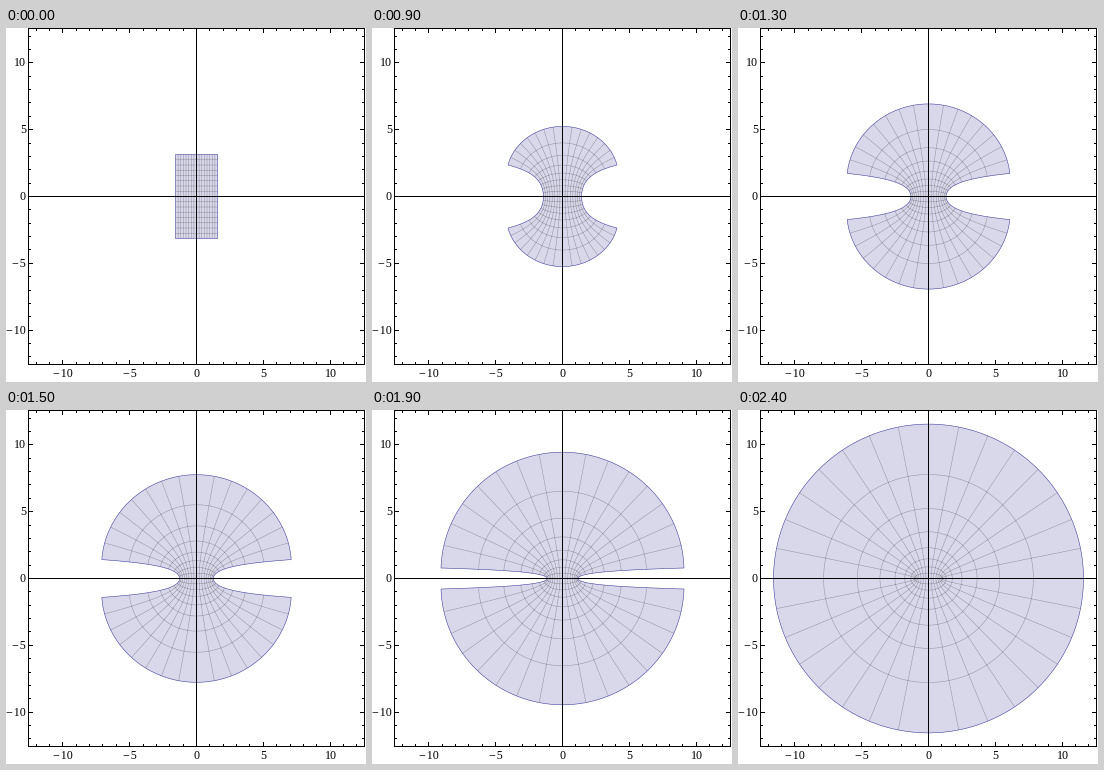
Recreate the animation shown at these times as a matplotlib script. Size 360x354 px, loop 2900 ms.

```python
import numpy as np
import matplotlib.pyplot as plt
from matplotlib.animation import FuncAnimation
from matplotlib.collections import LineCollection
from matplotlib.patches import Polygon

W, H, DPI = 360, 354, 100
PT = 72 / DPI                      # points per pixel
LEFT, RIGHT, TOP, BOTTOM = 22, 358, 0, 336
CX, CY = 190, 168
SCALE = (RIGHT - LEFT) / (8 * np.pi)
CELLS = 16
BLUE, FILL = "#3f3d99", "#d9d8eb"

fig = plt.figure(figsize=(W / DPI, H / DPI), dpi=DPI, facecolor="white")
ax = fig.add_axes([0, 0, 1, 1])
ax.set(xlim=(0, W), ylim=(H, 0))
ax.axis("off")


def strokes(segments):
    """One-pixel black lines through pixel centres."""
    ax.add_collection(LineCollection(np.array(segments) + 0.5, colors="black",
                                     linewidths=PT, capstyle="projecting",
                                     snap=False, zorder=5))


def label(x, y, n, ha):
    # a hair space sets the minus sign apart
    ax.text(x, y, str(n).replace("-", "\u2212\u200a"), ha=ha, va="baseline",
            family=["Liberation Serif", "DejaVu Serif"], size=12 * PT)


# frame, axes, ticks and labels
strokes([[(LEFT, TOP), (RIGHT, TOP)], [(LEFT, BOTTOM), (RIGHT, BOTTOM)],
         [(LEFT, TOP), (LEFT, BOTTOM)], [(RIGHT, TOP), (RIGHT, BOTTOM)],
         [(CX, TOP), (CX, BOTTOM)], [(LEFT, CY), (RIGHT, CY)]])
ticks = []
for n in range(-12, 13):
    size = 4 if n % 5 == 0 else 2
    x, y = round(CX + n * SCALE), round(CY - n * SCALE)
    ticks += [[(x, TOP), (x, TOP + size)], [(x, BOTTOM), (x, BOTTOM - size)],
              [(LEFT, y), (LEFT + size, y)], [(RIGHT, y), (RIGHT - size, y)]]
    if n % 5 == 0:
        label(x + 0.5, 349, n, "center")
        label(20, y + 4, n, "right")
strokes(ticks)

# the strip and its mesh in the complex plane
u = np.linspace(-np.pi / 2, np.pi / 2, 121)
v = np.linspace(-np.pi, np.pi, 121)
outline = np.concatenate([u - 1j * np.pi, np.pi / 2 + 1j * v,
                          u[::-1] + 1j * np.pi, -np.pi / 2 + 1j * v[::-1]])
inner = np.arange(1, CELLS) / CELLS - 0.5
mesh = [np.pi * k + 1j * v for k in inner] + [u + 2j * np.pi * k for k in inner]

region = Polygon([(0, 0)], closed=True, facecolor=FILL, edgecolor="none",
                 snap=False, zorder=1)
border = Polygon([(0, 0)], closed=True, fill=False, edgecolor=BLUE,
                 linewidth=0.55 * PT, joinstyle="round", snap=False, zorder=3)
ax.add_patch(region)
ax.add_patch(border)
grid = LineCollection([], colors=[(0, 0, 0, 0.3)], linewidths=0.55 * PT,
                      snap=False, zorder=2)
ax.add_collection(grid)


def warp(z, t):
    """Blend from the identity to the complex sine, in pixels."""
    w = (1 - t) * z + t * np.sin(z)
    return np.column_stack([CX + 0.5 + SCALE * w.real, CY + 0.5 - SCALE * w.imag])


def draw(i):
    t = np.clip(i - 4, 0, 20) / 20
    shape = warp(outline, t)
    region.set_xy(shape)
    border.set_xy(shape)
    grid.set_segments([warp(z, t) for z in mesh])
    return region, border, grid


anim = FuncAnimation(fig, draw, frames=29, interval=100, repeat=True,
                     repeat_delay=0, blit=False)
plt.show()
```
